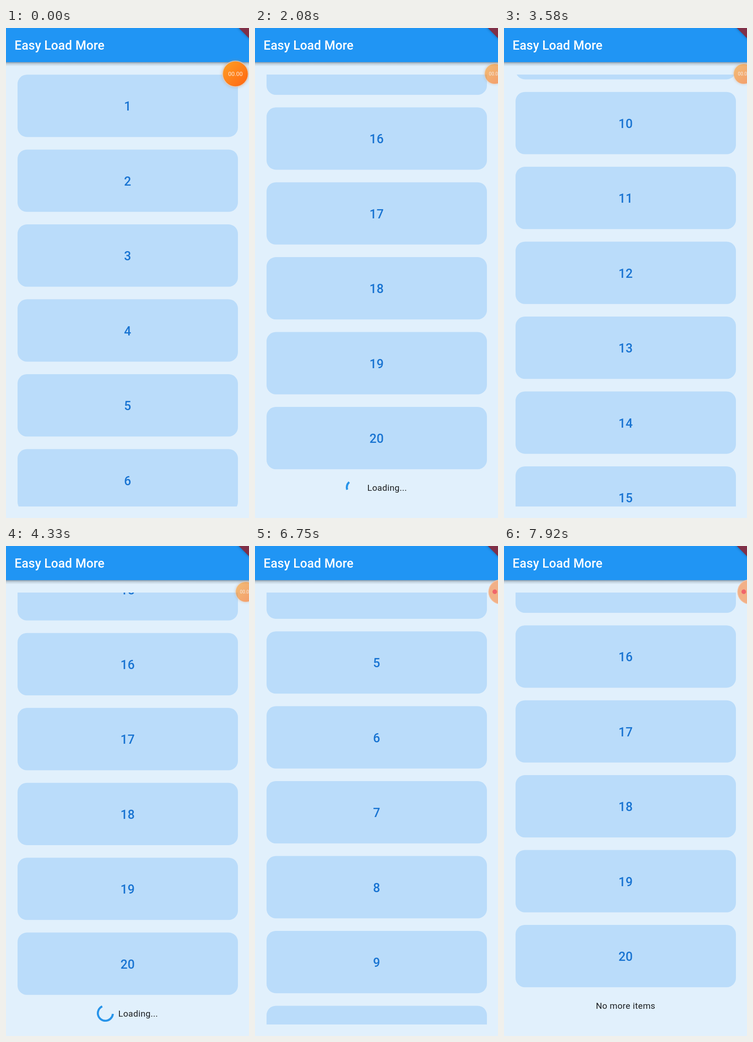
An HTML page that plays this animation: 527x1063 px, repeating every 8000 ms.

```html
<!DOCTYPE html>
<html lang="en">
<head>
<meta charset="utf-8">
<title>Easy Load More</title>
<style>
  html, body { margin: 0; width: 100%; height: 100%; overflow: hidden; background: #e1f0fc; }
  svg { display: block; width: 100vw; height: 100vh; font-family: Roboto, sans-serif; }
  .title { font-size: 27px; font-weight: 500; letter-spacing: .15px; fill: #fff; }
  .card rect { fill: #badcfa; }
  .card text { font-size: 27px; font-weight: 500; fill: #1974d2; text-anchor: middle; }
  .note { font-size: 18.94px; letter-spacing: .34px; fill: #1b1e21; }
  .middle { text-anchor: middle; }
</style>
</head>
<body>
<svg viewBox="0 0 527 1063" preserveAspectRatio="none">
  <defs>
    <clipPath id="viewport"><rect y="101" width="527" height="937"/></clipPath>
    <linearGradient id="barShadow" x2="0" y2="1">
      <stop offset="0" stop-color="#123" stop-opacity=".42"/>
      <stop offset=".4" stop-color="#123" stop-opacity=".16"/>
      <stop offset="1" stop-color="#123" stop-opacity="0"/>
    </linearGradient>
    <linearGradient id="orange" x2="1" y2="1">
      <stop offset=".1" stop-color="#ff9a22"/>
      <stop offset=".9" stop-color="#ff6a14"/>
    </linearGradient>
    <filter id="blur" x="-50%" y="-50%" width="200%" height="200%"><feGaussianBlur stdDeviation="3"/></filter>
  </defs>

  <rect width="527" height="1063" fill="#e1f0fc"/>
  <g clip-path="url(#viewport)">
    <g id="list"></g>
    <g id="footer">
      <g id="loading">
        <path id="arc" fill="none" stroke="#2794ea" stroke-width="4.4"/>
        <text class="note" x="243.6" y="1004">Loading...</text>
      </g>
      <text id="finished" class="note middle" x="263.7" y="1004">No more items</text>
    </g>
  </g>

  <rect y="74" width="527" height="9" fill="url(#barShadow)"/>
  <rect width="527" height="74" fill="#2095f4"/>
  <text class="title" x="18.6" y="47">Easy Load More</text>
  <path d="M502 -4H535V29Z" fill="#000" opacity=".45" filter="url(#blur)"/>
  <path d="M505 0H527V22Z" fill="#7f3048"/>

  <g id="bubble">
    <circle r="29.5" fill="#a9876f" opacity=".35" filter="url(#blur)"/>
    <circle r="29" fill="#e9cdb8" opacity=".7"/>
    <circle r="27" fill="url(#orange)"/>
    <text id="timer" class="middle" y="4.6" font-size="12.6" fill="#ffe8d8">00.00</text>
  </g>
  <g id="recordDot">
    <circle cx="533" cy="99.5" r="27" fill="#f3c3a4"/>
    <circle cx="533" cy="99.5" r="25.5" fill="#f2b086"/>
    <circle cx="520" cy="99.3" r="5" fill="#f0656b"/>
  </g>
</svg>
<script>
const LOOP = 8000, STEP = 1000 / 12;
const PITCH = 162.45, PAGE = 20 * PITCH, FIRST_END = 2365.75;
const $ = id => document.getElementById(id);
const clamp = x => Math.min(1, Math.max(0, x));

// Scroll path: time (ms), offset (px), speed (px/ms)
const scrollPath = [
  [0, 0, .8], [150, 300, 4.2], [585, 1977, 3.3], [715, FIRST_END, 2.7],
  [2917, FIRST_END, 0], [3070, 2645, 5], [3583.3, 4673.5, 2.5], [3925, 5226, 1.1],
  [4360, FIRST_END + PAGE, .6],
  [6417, FIRST_END + PAGE, 0], [6570, 5914, 6.6], [7083.3, 8441.9, 1.6],
  [7750, FIRST_END + 2 * PAGE, .1]
];
const loads = [{ from: 585, until: 2660 }, { from: 3920, until: 5995 }];

function scrollAt(t) {
  const i = scrollPath.findIndex(p => p[0] > t);
  if (i < 0) return scrollPath.at(-1)[1];
  const [t0, y0, v0] = scrollPath[i - 1], [t1, y1, v1] = scrollPath[i];
  if (y0 === y1) return y0;
  const d = t1 - t0, s = (t - t0) / d, r = 1 - s;
  return y0 * r * r * (1 + 2 * s) + y1 * s * s * (3 - 2 * s)
    + d * (v0 * s * r * r - v1 * s * s * r);
}

// cubic-bezier(.4, 0, .2, 1)
function fastOutSlowIn(x) {
  x = clamp(x);
  let lo = 0, hi = 1, s = .5;
  for (let i = 0; i < 20; i++) {
    s = (lo + hi) / 2;
    const bx = 1.2 * s * (1 - s) ** 2 + .6 * s * s * (1 - s) + s ** 3;
    if (bx < x) lo = s; else hi = s;
  }
  return s * s * (3 - 2 * s);
}

function spinnerPath(age) {
  const phase = age / 1333 % 1, turn = age / 2222 % 1;
  const head = fastOutSlowIn(phase * 2), tail = fastOutSlowIn(phase * 2 - 1);
  const start = Math.PI * (-.5 + 1.5 * tail + 2 * turn + .5 * phase);
  const sweep = Math.max(1.5 * Math.PI * (head - tail), .001);
  const at = a => `${215.5 + 16.3 * Math.cos(a)} ${997 + 16.3 * Math.sin(a)}`;
  return `M${at(start)}A16.3 16.3 0 ${+(sweep > Math.PI)} 1 ${at(start + sweep)}`;
}

$('list').innerHTML = Array.from({ length: 60 }, (_, i) => {
  const y = 101.2 + i * PITCH;
  return `<g class="card"><rect x="25" y="${y}" width="478" height="135.2" rx="20.3"/>
    <text x="263.7" y="${y + 78.2}">${i % 20 + 1}</text></g>`;
}).join('');
const cards = [...$('list').children];

const show = (el, on) => el.style.display = on ? '' : 'none';

function draw(t) {
  const offset = scrollAt(t);
  const page = loads.filter(l => t >= l.until).length;
  $('list').setAttribute('transform', `translate(0 ${-offset})`);
  cards.forEach((card, i) => show(card, i < 20 * (page + 1)));

  $('footer').setAttribute('transform', `translate(0 ${FIRST_END + page * PAGE - offset})`);
  const load = loads[page];
  show($('loading'), load);
  show($('finished'), !load);
  if (load) $('arc').setAttribute('d', spinnerPath(Math.max(0, t - load.from)));

  const dock = clamp((t - 1500) / 250), dotMode = t >= 4910;
  $('bubble').setAttribute('transform',
    `translate(${497.5 + 22.5 * dock} 99.5) scale(${1 - .2 * dock})`);
  $('bubble').setAttribute('opacity', 1 - .38 * dock);
  $('timer').textContent = t < 1000 ? '00.00' : '00.0' + Math.floor(t / 1000);
  show($('bubble'), !dotMode);
  show($('recordDot'), dotMode);
}

const begin = performance.now();
function tick(now) {
  const t = Math.max(0, now - begin) % LOOP;
  draw(Math.floor((t + 4) / STEP) % 96 * STEP);
  requestAnimationFrame(tick);
}
draw(0);
requestAnimationFrame(tick);
</script>
</body>
</html>
```
